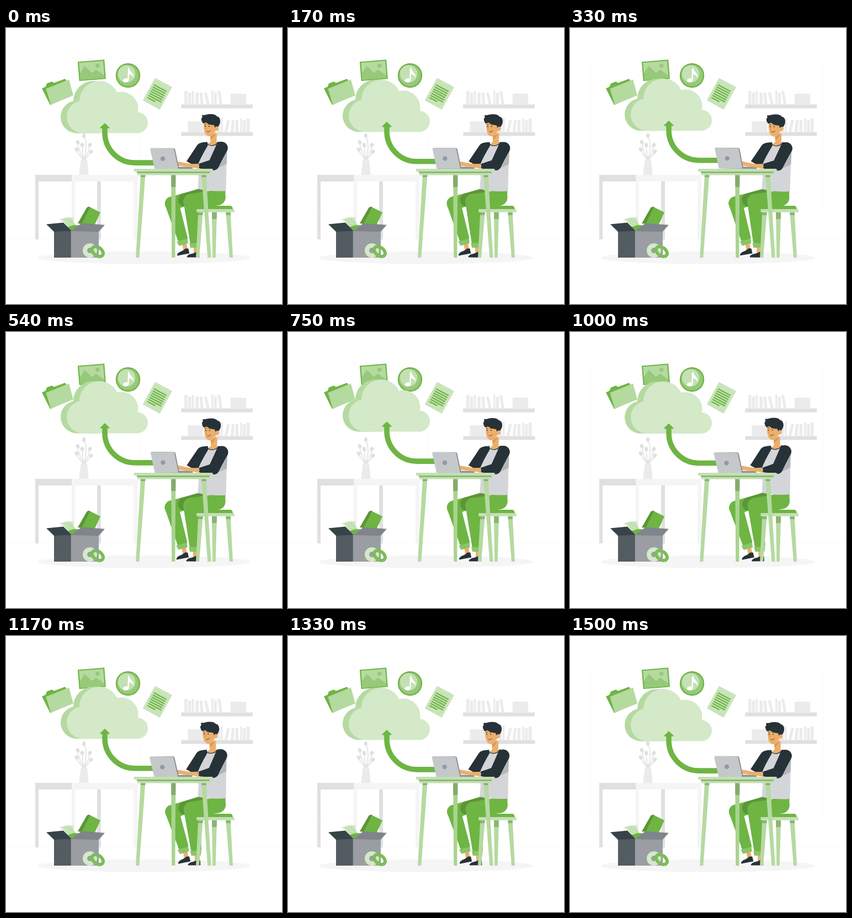
Write an HTML page with a canvas that moves like this. It is 500 px wide and 500 px high and loops after 1.54 s.

```html
<!DOCTYPE html>
<html lang="en">
<head>
<meta charset="utf-8">
<title>Cloud upload</title>
<style>
html, body { margin: 0; width: 100%; height: 100%; overflow: hidden; background: #fff; }
canvas { display: block; width: 100vw; height: 100vh; }
</style>
</head>
<body>
<canvas id="stage"></canvas>
<script>
const LOOP = 1540, CYCLE = 1500, RAD = Math.PI / 180;
const GREEN = '#6eb544', SHADE = '#5b9637', MID = '#97c97a', SOFT = '#b5daa0', PALE = '#d3e9c8';
const SLAB = '#c3e0b2', MOSS = '#84b16b', CUFF = '#8bc468';
const INK = '#263238', SKIN = '#ecaf6c', SHIRT = '#d4d5d8', GREY = '#e0e0e0', MIST = '#ebebeb', FOG = '#f5f5f5';

const canvas = document.getElementById('stage');
const ratio = window.devicePixelRatio || 1;
canvas.width = canvas.height = 500 * ratio;
const ctx = canvas.getContext('2d');

const fill = (color, d) => { ctx.fillStyle = color; ctx.fill(new Path2D(d)); };
const box = (color, x, y, w, h) => { ctx.fillStyle = color; ctx.fillRect(x, y, w, h); };
const line = (color, width, d) => {
  ctx.strokeStyle = color;
  ctx.lineWidth = width;
  ctx.stroke(new Path2D(d));
};
const ellipse = (x, y, rx, ry, turn) => {
  ctx.beginPath();
  ctx.ellipse(x, y, rx, ry, turn * RAD, 0, 2 * Math.PI);
};
const oval = (color, x, y, rx, ry = rx, turn = 0) => {
  ellipse(x, y, rx, ry, turn);
  ctx.fillStyle = color;
  ctx.fill();
};
const ring = (color, width, x, y, rx, ry = rx, turn = 0) => {
  ellipse(x, y, rx, ry, turn);
  ctx.strokeStyle = color;
  ctx.lineWidth = width;
  ctx.stroke();
};
const placed = (x, y, turn, draw) => {
  ctx.save();
  ctx.translate(x, y);
  ctx.rotate(turn * RAD);
  draw();
  ctx.restore();
};

// A bar that narrows from one centred end to the other.
const taper = (color, x1, y1, w1, x2, y2, w2) =>
  fill(color, `M${x1 - w1 / 2} ${y1}h${w1}L${x2 + w2 / 2} ${y2}h${-w2}Z`);

function furnitureLeg(color, cap, capHeight, x1, y1, w1, x2, w2) {
  const k = capHeight / (416 - y1);
  taper(color, x1, y1, w1, x2, 416, w2);
  taper(cap, x1, y1, w1, x1 + (x2 - x1) * k, y1 + capHeight, w1 + (w2 - w1) * k);
}

// Round joints [x, y, radius] joined by their outer tangents.
function limb(color, ...joints) {
  joints.forEach(joint => oval(color, ...joint));
  for (let i = 1; i < joints.length; i++) {
    const [x1, y1, r1] = joints[i - 1], [x2, y2, r2] = joints[i];
    const heading = Math.atan2(y2 - y1, x2 - x1);
    const spread = Math.acos((r1 - r2) / Math.hypot(x2 - x1, y2 - y1));
    ctx.beginPath();
    ctx.arc(x1, y1, r1, heading + spread, heading - spread);
    ctx.arc(x2, y2, r2, heading - spread, heading + spread);
    ctx.fill();
  }
}

function drawWall() {
  ctx.strokeStyle = MIST;
  ctx.lineWidth = 0.25;
  for (const x of [38.4, 254.7]) {
    ctx.beginPath();
    ctx.roundRect(x, 55.2, 204, 282.5, 5.6);
    ctx.stroke();
  }
  box(MIST, 0, 382.4, 500, 0.25);
}

function drawBooks() {
  const book = (x, w, top, lean = 0) => fill(MIST, `M${x} ${top}h${w}L${x + w + lean} 138.5h${-w}Z`);
  for (let i = 0; i < 4; i++) book(323 + 6.8 * i, i === 2 ? 3.6 : 5.5, 114 + 3 * (i % 2));
  for (let i = 0; i < 2; i++) {
    book(350.5 + 8.3 * i, 5, 117, 2 + 3 * i);
    book(372 + 4.8 * i, 3.5 + 1.5 * i, 113 + 4 * i);
  }
  book(383, 5, 114, 4);
  box(MIST, 407, 119, 28, 19.5);
  box(GREY, 317.2, 138.5, 130, 7);
}

function drawShelves() {
  drawBooks();
  ctx.save();
  ctx.translate(764.5, 50);
  ctx.scale(-1, 1);
  drawBooks();
  ctx.restore();
}

function drawSideboard() {
  for (const [color, x] of [[GREY, 53], [FOG, 119]]) {
    box(color, x, 278, 6, 105);
    box(color, x + 112, 278, 7, 105);
  }
  box(GREY, 53, 266, 66, 12);
  box(FOG, 119, 266, 119.5, 12);
}

function drawVase() {
  const tips = [[128, 220], [130, 207], [138, 212], [141, 195], [152, 212], [154, 224]];
  tips.forEach(([x, y], i) => {
    const bend = i === 3 ? 149 : x;
    line(GREY, 1.5, `M141 239Q${bend} ${(y + 239) / 2 - 4} ${x} ${y}`);
    oval(GREY, x, y, 3.2, 3.9, 3 * (x - 141));
  });
  taper(MIST, 141.2, 238, 11, 141.2, 266, 17.5);
}

function drawCarton() {
  fill(GREEN, 'M133 360 151 324 171 334 159 360Z');
  fill(SHADE, 'M130 354 146 326Q148 323 152.5 324L137 355Z');
  fill(PALE, 'M97 347Q109 341 122 343 122 353 127 359L111 360Q105 350 97 347Z');
  for (let i = 0; i < 4; i++) line(MID, 0.8, `M${104 + 2 * i} ${348 + 3 * i}q7 -3 15 -1`);
  fill(GREEN, 'M111 361Q122 355 133 358L119 369Z');
  box('#535c61', 87, 366, 31, 50);
  box('#9a9ea2', 117.7, 366, 50.3, 50);
  fill('#374349', 'M73 355.5 104 352.5 118.5 367.5 87 369Z');
  fill('#7f858a', 'M117.7 368 137 353.5 179 356.7 167.5 369.2Z');
  ring(PALE, 8, 152, 403, 9);
  ring('#7dbd58', 6, 166, 405, 11.2, 7.4, 36);
}

function drawFolder() {
  fill(GREEN, 'M65 109.5 71.5 106.5 74 100.5 83 97 87 99.5 107 92 109 95 121 121 80 139.5Z');
  fill(SOFT, 'M72.5 110 114 93.2 122 122.3 81 138.8Z');
}

function drawPicture() {
  placed(155.4, 76.7, -4.5, () => {
    box(GREEN, -24.2, -17.5, 48.4, 35);
    box(SOFT, -22, -15.5, 44, 31);
    fill(MID, 'M-22 4 -13 -8Q-11.5 -8.5 -10 -7L0 5 6 0Q8 -1 10 1L22 11V15.5H-22Z');
    oval(MID, 11, -7.5, 3.9);
  });
}

function drawDisc() {
  oval(GREEN, 221, 86, 22.2);
  oval(MID, 221, 86, 19.8);
  oval('#c3e1b3', 218.5, 83, 15.8);
  oval('#fff', 217, 94.8, 5.4, 3.7, -10);
  fill('#fff', 'M221 72.5H223.4C223.5 79 232 81 231 91 229 86 227 84.5 223.2 83.5L222.4 95H220.2Z');
}

function drawSheet() {
  fill('#c9e4bb', 'M270 90.5 301 107 278.5 148 247.8 131Z');
  for (let i = 0; i < 7; i++) {
    const length = i === 6 ? 14.5 : 23;
    line(GREEN, 2.3, `M${267.8 - 1.95 * i} ${102.8 + 3.85 * i}l${length} ${length * 0.53}`);
  }
}

function drawCloud() {
  const lobes = [[169, 131.5, 36], [139.5, 160.5, 29.5], [209, 145.5, 30.5], [238, 171, 19]];
  const puff = (color, shift, count, right) => placed(shift, 0, 0, () => {
    lobes.slice(0, count).forEach(lobe => oval(color, ...lobe));
    fill(color, `M139.5 190V140L169 110 ${right} 152V190Z`);
  });
  puff(SOFT, -11, 2, 180);
  puff(PALE, 0, 4, 238);
  line(GREEN, 9.6, 'M179 178V189A54.5 54.5 0 0 0 233.5 243.5H285');
  fill(GREEN, 'M178.2 172.3Q179 171.6 179.8 172.3L187.6 180Q187.8 181.2 187 181.2H171Q170 181 170.4 180Z');
}

function drawTrousers() {
  const shoe = () => fill(INK, 'M0 8Q3 4 9 3.5 14 2 17 0L22 1 22.3 10H1Q-1 10 0 8Z');
  taper(SKIN, 322.5, 388, 8, 325.5, 403, 8);
  taper(SKIN, 344, 394, 8, 344, 409, 8);
  placed(308.5, 402.7, -11, shoe);
  placed(328, 405.5, 0, shoe);

  limb(GREEN, [352, 302, 11], [300.5, 318, 12.5], [319.5, 380, 9.3]);
  placed(320, 388.5, -15, () => taper(CUFF, 0, -4.3, 20, 0.5, 4.3, 17));
  limb(SHADE, [352, 302, 11], [324, 311.5, 12]);
  box(GREEN, 370, 292, 27.5, 15);
  limb(GREEN, [383.3, 307, 14.2], [335.5, 314.5, 14], [342.7, 385, 9.7]);
  taper(CUFF, 342.2, 389.5, 20.3, 342.5, 398, 17);
}

function drawTorso() {
  fill(SHIRT, 'M365 209 357 224 345 249 349 270 347.5 291.5Q372 297 398.5 295L400 222 384 208Z');
  fill('#b3b5b9', 'M400.5 220 399.7 246Q391 251 384 253Q394 240 400.5 220Z');
  fill(INK, 'M365 206.5C353 207 350 208.5 346.5 212L327 241.5 337 247H348Q353 234 365.5 213Z');
  fill(SKIN, 'M369.5 192 382 190.5 381.5 206 383.5 208Q376 216 365 210.5L370.5 206Z');
  line(INK, 1.3, 'M363.5 208.5Q367 213.5 374 213 382 211.5 384 206.5');
  fill(INK, 'M383.5 206.2H392V226L381 213Z');
  limb(INK, [390.7, 217.2, 11], [376, 247.5, 10], [353, 249.8, 4.8]);
}

function drawHead() {
  fill(SKIN, 'M359 169C357.5 178 358 186 361 191.5 364 196.5 368 196.5 372 195.5L380 186V168L364 164Z');
  fill('#dc9a56', 'M370.5 196Q376 194.5 379.5 188Q378.5 197 371 202Z');
  fill(INK, 'M357.5 173C353 168 353 163 356 161.5 354.5 160 355 158 356 157.5 361 158.5 363 156 370 156 377 156 380 157.5 382 160 388 161 389 168 387.5 173L385 178 379 182 377 176Q367 175.5 362.5 171Z');
  oval(SKIN, 381.5, 182.2, 3.5, 4, 20);
  for (const side of [-1, 1]) {
    const x = 364.4 + 3.6 * side;
    oval(INK, x, 178, 0.8, 1.2);
    line(INK, 0.8, `M${x - 2} 175q2 -1.5 4 -0.3`);
  }
  line(INK, 0.8, 'M363.5 187.8Q367.5 189 370.5 185.6');
  line('#d98d45', 0.7, 'M363.2 178 361.4 184 363.6 184.3');
}

function drawLaptop() {
  box('#8f9398', 300, 251.5, 38, 3.7);
  limb(SKIN, [346, 250, 4], [334, 249.3, 3], [313.5, 246, 3.6]);
  fill('#85898e', 'M263 217.7H304Q306 218 306.4 220L313.8 255.2H270Z');
  fill('#c5c8cb', 'M262.5 217.8Q260.8 217.8 261.2 219.5L268.8 253.5Q269.3 255 270.5 255H312L304.5 219.5Q304.2 218.3 303 218.3Z');
  oval('#9599a0', 284, 236.8, 4.2);
}

function drawMan() {
  drawTrousers();
  drawTorso();
  drawHead();
  drawLaptop();
}

function drawStool() {
  const middle = 377.5;
  furnitureLeg(SOFT, '#8ab573', 12, middle, 334, 9, middle - 0.5, 5.5);
  for (const side of [-1, 1]) {
    furnitureLeg(SOFT, '#8ab573', 5, middle + 25 * side, 334, 8.5, middle + 30.5 * side, 6);
  }
  fill(GREEN, 'M347 322H407Q410.5 323 411 328.3H344Q344 323 347 322Z');
  box(SLAB, 345.5, 328, 68.2, 5.8);
}

function drawDesk() {
  const middle = 303.3;
  furnitureLeg('#a9d48f', '#84aa70', 22, middle, 266, 8.2, middle, 6);
  for (const side of [-1, 1]) {
    furnitureLeg(SOFT, MOSS, 4, middle + 55.1 * side, 266, 8.4, middle + 65.1 * side, 6.3);
  }
  box(SLAB, 238, 262, 131, 4.6);
  box(MOSS, 237, 260, 132, 2.7);
  ctx.fillStyle = SLAB;
  ctx.beginPath();
  ctx.roundRect(231.7, 255, 143, 5.2, 1.5);
  ctx.fill();
}

// Linear sway: 0 at start, 1 at a quarter, -1 at three quarters, 0 at the end.
const sway = p => p < 0.25 ? 4 * p : p < 0.75 ? 2 - 4 * p : 4 * p - 4;
const lift = p => -10 * (1 - Math.abs(1 - 2 * p));

function frame(now) {
  const phase = Math.min(now % LOOP, CYCLE) / CYCLE;
  ctx.setTransform(ratio, 0, 0, ratio, 0, 0);
  box('#fff', 0, 0, 500, 500);
  drawWall();
  drawShelves();
  drawSideboard();
  drawVase();
  oval(FOG, 250, 416.2, 193.9, 11.3);
  drawCarton();
  drawFolder();
  drawPicture();
  drawDisc();
  drawSheet();
  placed(0, 0.6 + lift(phase), 0, drawCloud);
  placed(331, 286, sway(phase), () => {
    ctx.translate(-331, -286);
    drawMan();
  });
  drawStool();
  drawDesk();
  requestAnimationFrame(frame);
}
requestAnimationFrame(frame);
</script>
</body>
</html>
```
